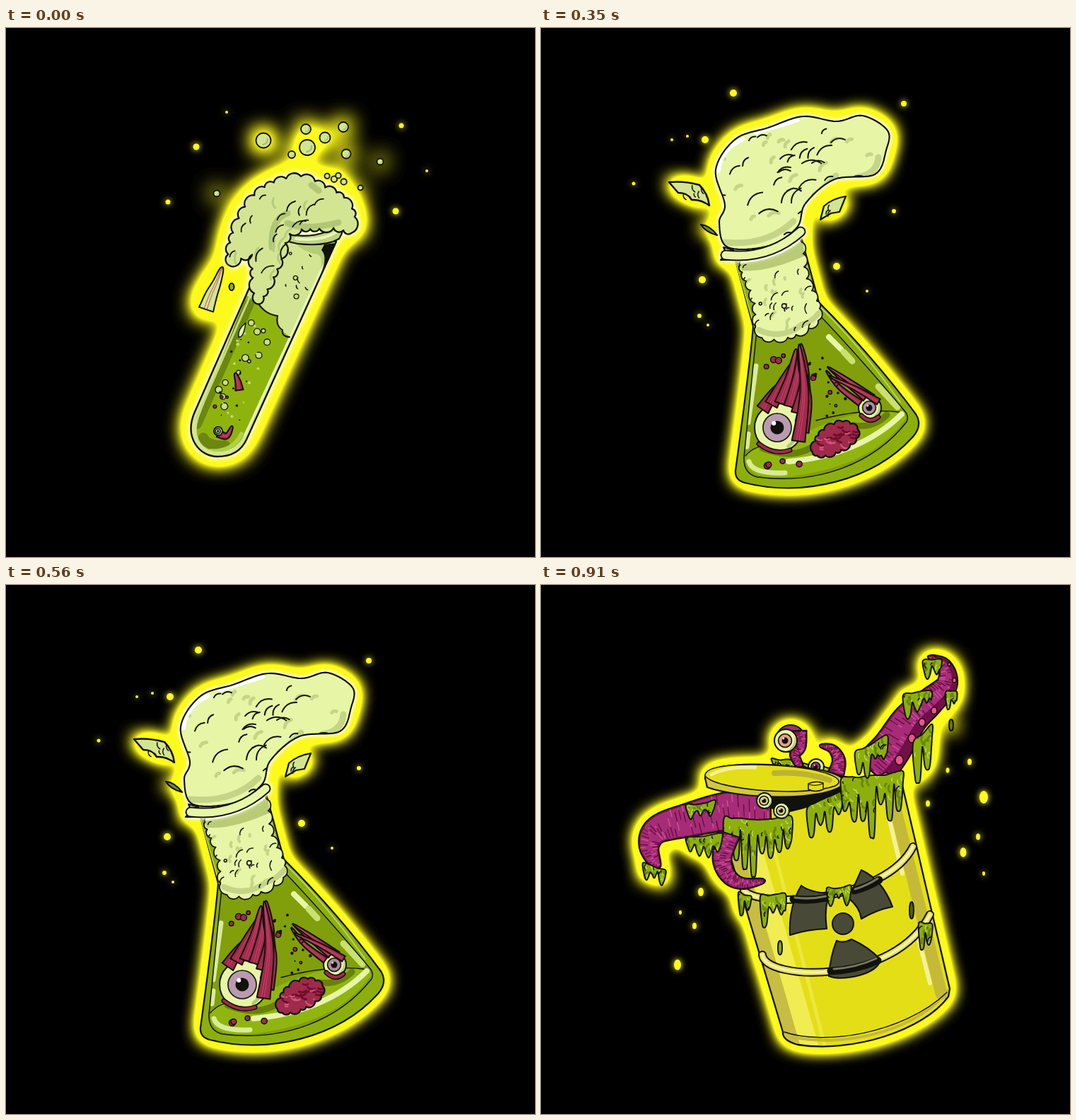
These frames come from a looping animation (748x748 px, 1050 ms). An HTML page:

```html
<!DOCTYPE html>
<html lang="en">
<head>
<meta charset="utf-8">
<title>Toxic lab</title>
<style>
  html, body { margin: 0; width: 100%; height: 100%; overflow: hidden; background: #000; }
  svg { display: block; width: 100vw; height: 100vh; stroke-linecap: round; stroke-linejoin: round; }
  .scene { visibility: hidden; animation: turn 1050ms step-end infinite; }
  #flask { animation-delay: -700ms; }
  #barrel { animation-delay: -350ms; }
  @keyframes turn {
    0% { visibility: visible; }
    33.3333%, 100% { visibility: hidden; }
  }
</style>
</head>
<body>
<svg id="stage" viewBox="0 0 748 748"></svg>
<script>
const INK = '#11120b', SLIME = '#8caf0d', FOAM = '#d3e592', CREAM = '#e7f5a6', SHADE = '#c5d588';
const RED = '#a02a4b', FLESH = '#a62c78', YELLOW = '#e4de17', GLOW = '#fcf91c';

const points = s => s.trim().split(/\s+/).map(p => p.split(',').map(Number));
const path = (p, end = 'Z') => 'M' + p.map(q => q.map(v => v.toFixed(1))).join('L') + end;
const mix = (a, b, t) => a + (b - a) * t;
const times = (n, make) => Array.from({ length: n }, (_, i) => make(i));

function random(seed) {
  seed = seed * 7919 + 13;
  const next = () => (seed = (seed * 16807) % 2147483647) / 2147483647;
  next();
  return next;
}

// Samples of a smooth line through a few key points
function smooth(keys, closed = true, steps = 10) {
  const p = typeof keys === 'string' ? points(keys) : keys, n = p.length;
  const at = i => closed ? p[(i + n) % n] : p[Math.max(0, Math.min(n - 1, i))];
  const out = times((closed ? n : n - 1) * steps, k => {
    const i = Math.floor(k / steps), t = (k % steps) / steps;
    return [0, 1].map(j => {
      const [a, b, c, d] = [-1, 0, 1, 2].map(o => at(i + o)[j]);
      return b + .5 * t * (c - a + t * (2 * a - 5 * b + 4 * c - d + t * (3 * (b - c) + d - a)));
    });
  });
  return closed ? out : [...out, p[n - 1]];
}
const curve = keys => path(smooth(keys));

// Clockwise outline made of round bumps of uneven size
function lumps(keys, size, seed = 1) {
  const rnd = random(seed), picks = [];
  let gap = 0;
  for (const p of smooth(keys, true, 24)) {
    const last = picks[picks.length - 1];
    if (last && Math.hypot(p[0] - last[0], p[1] - last[1]) < gap) continue;
    picks.push(p);
    gap = size * mix(.65, 1.35, rnd());
  }
  return `M${picks[0]}` + picks.map((a, i) => {
    const b = picks[(i + 1) % picks.length], r = Math.hypot(b[0] - a[0], b[1] - a[1]) * .58;
    return `A${r} ${r} 0 0 1 ${b}`;
  }).join('') + 'Z';
}

const ink = (d, fill, width = 2.2) => `<path d="${d}" fill="${fill}" stroke="${INK}" stroke-width="${width}"/>`;
const flat = (d, fill) => `<path d="${d}" fill="${fill}"/>`;
const line = (d, color = INK, width = 1.6) => `<path d="${d}" fill="none" stroke="${color}" stroke-width="${width}"/>`;
const oval = (x, y, rx, ry, fill, width = 0) =>
  `<ellipse cx="${x}" cy="${y}" rx="${rx}" ry="${ry}" fill="${fill}" stroke="${INK}" stroke-width="${width}"/>`;
const lit = (name, content) => `<g filter="url(#${name})">${content}</g>`;

let clips = 0;
function clipped(d, content) {
  const id = `clip${++clips}`;
  return `<clipPath id="${id}"><path d="${d}"/></clipPath><g clip-path="url(#${id})">${content}</g>`;
}
const textured = (d, fill, texture, width) => flat(d, fill) + clipped(d, texture) + ink(d, 'none', width);

// Short bent strokes scattered in a box
function marks(seed, count, [x, y, w, h], size, angle, color = INK, width = 1.5) {
  const rnd = random(seed);
  return line(times(count, () => {
    const a = angle + (rnd() - .5) * 1.1, l = size * (.4 + rnd());
    const dx = Math.cos(a) * l, dy = Math.sin(a) * l;
    return `M${x + rnd() * w},${y + rnd() * h}q${dx * .5 - dy * .35},${dy * .5 + dx * .35} ${dx},${dy}`;
  }).join(''), color, width);
}

// Round specks scattered along a band between two points
function specks(seed, count, [x1, y1], [x2, y2], spread, size, fill, width = 0) {
  const rnd = random(seed);
  return times(count, i => {
    const t = (i + rnd()) / count, r = size * mix(.45, 1, rnd());
    return oval(mix(x1, x2, t) + (rnd() - .5) * spread, mix(y1, y2, t) + (rnd() - .5) * 12, r, r, fill, width);
  }).join('');
}

const bubbles = s => points(s).map(([x, y, r]) => oval(x, y, r, r, FOAM, 1.8) +
  line(`M${x + r * .55},${y - r * .2}q${r * .1},${r * .6} ${-r * .6},${r * .75}`, '#a9bf6a', r * .22)).join('');
const sparks = (s, tall = 1) => lit('spark', points(s).map(([x, y, r]) => oval(x, y, r, r * tall, GLOW)).join(''));

function eye(x, y, r, color) {
  const cx = x - r * .06;
  return oval(x, y, r, r, CREAM, 2) +
    line(`M${x + r * .4},${y + r * .78}q${r * .5},${-r * .4} ${r * .45},${-r}`, '#b8c47b', r * .14) +
    oval(cx, y, r * .59, r * .59, color, 1.6) + oval(cx, y, r * .28, r * .28, INK) +
    oval(x - r * .2, y - r * .18, r * .09, r * .09, '#fff');
}

// Tapering limb along a centre line, wrinkled across
function limb(keys, width, { fill = FLESH, power = .6, seed = 1, suckers = false, wrinkles = true } = {}) {
  const c = smooth(keys, false, 9), last = c.length - 1, rnd = random(seed);
  const half = i => width * (1 - i / last) ** power + .6;
  const offset = (i, u) => {
    const a = c[Math.max(0, i - 1)], b = c[Math.min(last, i + 1)];
    const dx = b[0] - a[0], dy = b[1] - a[1], k = half(i) * u / (Math.hypot(dx, dy) || 1);
    return [c[i][0] - dy * k, c[i][1] + dx * k];
  };
  const strip = (u, v) => path([...c.map((_, i) => offset(i, u)), ...c.map((_, i) => offset(i, v)).reverse()]);
  const outline = strip(-1, 1);
  const folds = color => line(c.map((_, i) => {
    const u = mix(-1.1, .5, rnd());
    return path([offset(i, u), offset(i, u + .6)], '');
  }).join(''), color, 1.5);
  const under = suckers ? flat(strip(.4, 1), '#711047') + c.map((_, i) => {
    const [x, y] = offset(i, .66), r = half(i) * .2;
    return i % 6 === 2 ? oval(x, y, r, r * 1.2, '#ef528d', 1.5) : '';
  }).join('') : '';
  const texture = wrinkles ? line(outline, '#7d1552', 5) + folds('#cf4f9a') + folds('#66103f') : line(strip(-.3, .1), '#c9456c', 1);
  return textured(outline, fill, texture + under, 2);
}

// Strands that fan out from an eyeball and meet near a tip
function strands(x, y, r, from, to, tip, count) {
  const rnd = random(count);
  return times(count, i => {
    const a = mix(from, to, i / (count - 1)), cos = Math.cos(a), sin = Math.sin(a);
    const base = [x + cos * r, y + sin * r];
    const end = [tip[0] + (rnd() - .5) * r * .5, tip[1] + rnd() * r * 1.2 * Math.abs(2 * i / (count - 1) - 1)];
    const bend = [mix(base[0], end[0], .5) + cos * r * .3 + (rnd() - .5) * 5, mix(base[1], end[1], .5)];
    return limb([base, bend, end], r * .26, { fill: RED, power: .7, wrinkles: false });
  }).join('');
}

// Slime lying along an edge, with drips of uneven length
function slime(x1, y1, x2, y2, depth) {
  const rnd = random(x1 + y1), count = Math.max(2, Math.round((x2 - x1) / 12)), w = (x2 - x1) / count;
  const top = times(count + 1, i => [x1 + i * w, mix(y1, y2, i / count) - 4 * rnd()]);
  const drips = times(count, i => {
    const u = 1 - (i + .5) / count, x = mix(x1, x2, u), y = mix(y1, y2, u);
    const tip = y + depth * mix(.45, 1, rnd());
    return [[x + w * .48, y + depth * mix(.15, .4, rnd())], [x + w * .28, tip - w * .5], [x, tip], [x - w * .28, tip - w * .5]];
  }).flat();
  const box = [x1, Math.min(y1, y2), x2 - x1, depth * .6], n = count * 3;
  return textured(curve([...top, ...drips]), SLIME,
    marks(x1, n, box, 9, 1.5, '#6a860b', 3) + marks(x2, n, box, 6, 1.2, '#bfd846', 1.6) + marks(y1, count, box, 7, 1.8), 2);
}

function tube() {
  const glass = 'M378,290L266,545C252,580 274,606 299,606C320,606 333,597 340,582L467,302Z';
  const liquid = 'M340,378L357,388Q371,406 384,407Q382,424 402,437L335,578C326,598 297,606 280,592C266,580 268,562 275,545Z';
  const foam = lumps(`316,336 318,300 335,258 354,234 380,218 420,210 450,225 478,240 493,268 484,298
    474,284 440,284 402,290 388,330 368,372 354,390 349,350 346,318`, 17, 4);
  const foamBox = [322, 225, 155, 140];
  const drip = limb('283,398 290,378 298,360 306,338', 10, { fill: FOAM, wrinkles: false });
  const body = flat(glass, FOAM) +
    clipped(glass, flat(liquid, '#8fb30d') +
      clipped(liquid, line('M270,560L344,390M279,579Q285,592 310,590', '#6c8710', 14) + line('M289,598Q320,600 333,574', '#b3cf43', 6)) +
      line('M269,553L354,359', '#c6dc77', 3) + line('M338,575L458,315', '#e8f4b9', 3) +
      flat('M405,301L463,304L445,341Q450,319 435,319Q418,315 405,301Z', '#b6cc77') +
      flat('M450,306L466,304L446,345Q455,323 446,314Z', INK)) +
    line('M357,390Q367,405 384,407Q381,421 391,427Q389,436 401,437', INK, 2) + ink(glass, 'none', 2.4) +
    ink('M396,291C423,297 452,294 474,276Q479,286 471,298C451,310 412,307 397,301Z', '#bfd37c') +
    line('M410,298Q446,302 466,289', '#e7f5ba', 4) +
    textured(foam, FOAM, line('M398,262Q374,270 376,310M432,222l10,8M398,276Q424,287 470,275', '#b1c777', 9) +
      marks(31, 16, foamBox, 14, 1.9, '#b7cb7c', 3) + marks(8, 24, foamBox, 15, 2.2, INK, 1.8), 2.3);
  return lit('whiteWide', body) + lit('glowDrip', drip) +
    bubbles('364,159,10.5 426,169,11 424,143,7 451,155,7.5 477,140,7 481,178,6.5 404,179,5 529,189,4.5 298,234,4.5') +
    specks(6, 5, [450, 203], [500, 222], 8, 4.5, FOAM, 1.8) + oval(319, 366, 3.5, 5, '#8fa64a', 2) +
    specks(3, 12, [367, 405], [308, 540], 44, 5, '#c9de82', 1.3) + specks(9, 14, [358, 412], [306, 570], 50, 2.3, '#c5dc70') +
    specks(5, 12, [350, 425], [305, 570], 50, 2, INK) + specks(2, 3, [404, 314], [412, 382], 4, 3.6, '#c9de82', 1.3) +
    ink('M339,417Q327,426 329,437Q336,438 339,417Z', '#e3efbc', 1.5) +
    limb('330,512 328,500 324,488', 5, { fill: RED, wrinkles: false }) +
    specks(7, 3, [315, 517], [295, 533], 4, 3, RED, 1.2) +
    limb('300,573 312,577 320,563', 5, { fill: RED, wrinkles: false }) + eye(300, 570, 6, '#d4d5aa') +
    marks(12, 6, [385, 320, 45, 60], 6, 1.2);
}

function flask() {
  const glass = 'M275,328L300,422Q296,472 275,626Q274,639 288,643C370,664 470,640 526,578Q540,562 530,546Q470,465 393,388L368,296Z';
  const inner = 'M305,428L287,607Q286,630 306,635C390,646 470,617 517,557Q521,548 513,540Q450,465 392,404Z';
  const floor = 'M289,603Q306,588 342,590Q402,553 464,542Q509,537 517,551C480,604 421,625 354,634Q284,643 289,603Z';
  const neck = lumps('282,330 325,319 365,298 374,350 395,404 372,428 335,440 306,432 302,385', 14, 3);
  const plume = curve(`264,310 252,275 260,250 247,200 275,157 321,141 370,125 418,132 455,124 490,145
    488,173 472,207 415,214 374,248 362,282 322,308`);
  const collar = 'M261,321Q322,328 367,288';
  const lump = lumps('384,600 396,572 428,557 450,572 432,592 404,604', 12, 5);
  const plumeBox = [258, 140, 210, 150], neckBox = [288, 333, 95, 92], lumpBox = [386, 562, 60, 36];
  return ink(glass, SLIME) + flat(inner, '#819e0b') +
    clipped(inner, flat(floor, '#91b50f') + line('M350,613Q451,604 510,546M407,437L424,454', CREAM, 8) +
      line('M294,613Q299,631 345,629M304,478L293,558M293,574L291,592', '#d9eb98', 7) +
      line('M428,458L440,471M477,507L504,536', '#c9e16f', 9) +
      line('M313,594Q365,615 399,580M442,562Q470,566 489,547', '#68800a', 9)) +
    line('M289,605Q305,586 341,589M389,555Q456,537 506,543', INK, 1.3) + ink(inner, 'none', 1.5) +
    line('M276,332L302,424M367,303L389,389Q449,446 508,529', '#c7df68', 1.5) +
    textured(neck, CREAM, flat('M279,333Q334,329 370,299L373,322Q320,346 284,343Z', '#bacb75') +
      line('M308,427Q341,442 369,419Q380,418 393,403', SHADE, 8) +
      marks(42, 13, neckBox, 6, 2, SHADE, 4) + marks(19, 22, neckBox, 10, 2.1), 1.8) +
    lit('whiteTight', textured(plume, CREAM,
      line('M260,303Q319,309 357,273M386,238Q409,218 417,209M447,211Q475,207 477,183', SHADE, 9) +
      marks(23, 18, plumeBox, 11, 2.5, SHADE, 5) + line('M251,202Q254,171 286,157M303,148Q345,136 363,130', '#fff', 6) +
      marks(8, 34, plumeBox, 20, 2.6, INK, 2), 2.2) +
      ink('M272,314L258,310L262,319L254,328L272,328Z', CREAM) + line(collar, INK, 15) + line(collar, CREAM, 11)) +
    eye(465, 537, 16, '#a98ca1') + strands(465, 537, 15, -2.7, -.6, [405, 478], 4) +
    eye(336, 565, 34, '#b99aaf') + strands(336, 565, 34, -2.3, .6, [365, 443], 8) +
    line('M308,588Q330,605 352,597M453,548Q465,560 477,550', INK, 7) + line('M308,588Q330,605 352,597M453,548Q465,560 477,550', RED, 4) +
    textured(lump, RED, marks(27, 14, lumpBox, 11, .3, '#6d102c', 3) + marks(17, 10, lumpBox, 8, .2, '#d2597d', 2), 2.3) +
    specks(4, 4, [318, 475], [345, 468], 4, 5, RED, 1.5) + specks(11, 4, [308, 617], [365, 612], 6, 5, RED, 1.5) +
    specks(8, 5, [385, 480], [420, 530], 40, 3.5, RED, 1.3) + specks(2, 14, [385, 455], [415, 548], 50, 2.3, INK) +
    specks(13, 2, [305, 386], [375, 403], 6, 3.8, CREAM, 1.6) +
    ink('M181,218Q203,216 224,222Q236,234 238,251Q226,242 213,243Q208,233 194,233Z', FOAM, 2.5) +
    ink('M395,271L400,252Q412,241 431,238L422,260L410,262Z', FOAM) + ink('M226,278Q239,279 249,293Q233,289 226,278Z', '#758b28') +
    marks(3, 5, [198, 222, 30, 14], 8, 1) + marks(6, 3, [402, 247, 18, 12], 7, 2);
}

function barrel() {
  const can = 'M248,318L342,632Q341,644 363,650C440,662 541,630 576,582L578,571L508,271Z';
  const rings = 'M287,432C313,459 488,446 526,370M313,523C317,560 500,566 550,466';
  const dark = '#494938';
  return slime(326, 246, 428, 262, 20) + oval(353, 217, 20, 19, FLESH, 2) +
    limb('366,206 366,228 359,241 368,258', 9, { power: .3 }) + eye(346, 220, 16, '#e3a08b') + eye(389, 257, 11, FLESH) +
    limb('417,268 421,248 412,232 394,227', 11, { seed: 5 }) +
    limb('468,264 495,232 522,190 550,165 574,140 570,113 547,101', 31, { power: .7, seed: 3, suckers: true }) +
    flat(can, YELLOW) +
    clipped(can, line('M256,320L354,648', '#c7bd43', 24) + line('M292,345L379,650', '#f0ec52', 25) + line('M326,360L401,651', '#ede73d', 5) +
      line('M499,308L566,578', '#c5ba37', 17) + line('M491,325L511,408M531,489L550,563', '#f4f09b', 6) +
      line('M354,639C438,656 538,625 575,573', '#c5b936', 4)) +
    ink(can, 'none', 2.3) + line('M344,632C398,651 511,636 574,576', INK, 1.4) +
    line(rings, INK, 12) + line(rings, '#e4df68', 8) + line(rings, '#f8f5a4', 3) +
    ink('M352,495Q350,455 368,425Q381,435 408,436Q400,457 404,486Q376,487 352,495Z', dark) +
    ink('M435,443L453,403Q483,417 497,455Q475,459 453,472Q451,456 435,443Z', dark) +
    ink('M418,503Q428,507 439,501Q464,512 480,530Q476,545 450,552Q423,559 407,553Q409,525 418,503Z', dark) +
    oval(427, 479, 15, 15, dark, 2) +
    line('M357,444Q381,447 404,442M443,432Q462,427 478,417M410,546Q446,544 476,531', INK, 11) +
    line('M359,442Q381,445 403,440M444,430Q461,425 476,415M414,543Q446,541 474,528', '#777763', 3) +
    flat('M300,298Q370,302 428,283L424,297Q385,314 352,321L300,312Z', INK) +
    limb('325,318 265,320 210,332 165,346 153,371 166,402', 30, { power: .5, seed: 7 }) +
    slime(258, 334, 355, 330, 82) + limb('266,352 256,386 265,411 285,422 317,418', 15, { power: .5, seed: 9 }) +
    ink('M232,273C230,252 302,251 356,257C402,259 433,270 429,281C399,308 280,302 235,286Z', '#d2c642') +
    ink('M232,270C231,251 307,252 357,257C407,263 433,275 416,284C371,300 248,290 232,270Z', YELLOW, 1.6) +
    line('M241,268Q263,256 303,258', '#f4f097', 5) + line('M330,266Q371,263 408,276', '#bdb332', 8) +
    ink('M378,281Q388,276 399,280V289Q388,294 378,289Z', YELLOW, 1.5) + line('M379,282Q389,285 398,281', INK, 1.2) +
    eye(316, 305, 11, '#d8cf90') + eye(340, 319, 11, '#d8cf90') +
    slime(376, 318, 440, 286, 48) + slime(424, 276, 512, 266, 88) + slime(444, 240, 490, 214, 48) +
    slime(512, 160, 552, 150, 32) + slime(540, 110, 566, 108, 28) + slime(572, 153, 588, 153, 28) + slime(526, 225, 553, 200, 65) +
    slime(205, 314, 246, 306, 26) + slime(205, 360, 256, 354, 38) + slime(144, 394, 176, 404, 34) +
    slime(310, 441, 346, 440, 50) + slime(404, 431, 438, 426, 28) + slime(534, 482, 553, 480, 42) + slime(279, 437, 297, 440, 34) +
    oval(580, 198, 3, 8, '#627d0c', 2) + oval(338, 513, 3, 10, SLIME, 2) + oval(524, 460, 3, 12, '#50610c', 2);
}

function filter(id, blur, slope, color) {
  return `<filter id="${id}" filterUnits="userSpaceOnUse" x="0" y="0" width="748" height="748" color-interpolation-filters="sRGB">
    <feGaussianBlur in="SourceAlpha" stdDeviation="${blur}"/>
    <feComponentTransfer result="mask"><feFuncA type="linear" slope="${slope}"/></feComponentTransfer>
    <feFlood flood-color="${color}"/><feComposite in2="mask" operator="in"/>
    <feMerge><feMergeNode/><feMergeNode in="SourceGraphic"/></feMerge>
  </filter>`;
}

const scene = (id, glow, art, dots) => `<g id="${id}" class="scene">${dots}${lit(glow, art)}</g>`;

document.getElementById('stage').innerHTML =
  `<defs>${filter('glowWide', 15, 4.5, GLOW)}${filter('glow', 12.5, 4.5, GLOW)}${filter('glowDrip', 4, 5, GLOW)}
    ${filter('spark', 5, 1.1, GLOW)}${filter('whiteWide', 5, 1.7, '#ffffdf')}${filter('whiteTight', 3, 2, '#fffff0')}</defs>` +
  scene('tube', 'glowWide', tube(), sparks('269,168,4.5 229,246,3.5 559,138,3.5 551,259,4.5 312,119,2 595,202,2')) +
  scene('flask', 'glow', flask(), sparks(`272,92,5 513,107,4 232,158,5 207,153,2 185,158,2 131,220,2.5
    499,259,3 228,356,5 418,337,5 461,372,2 224,407,3 236,420,2`)) +
  scene('barrel', 'glow', barrel(), sparks(`626,300,6 606,250,3 575,262,2.5 547,309,3 618,356,3 597,378,4.5
    193,537,5 217,482,3 226,434,4 197,463,2 626,408,2`, 1.5));
</script>
</body>
</html>
```
